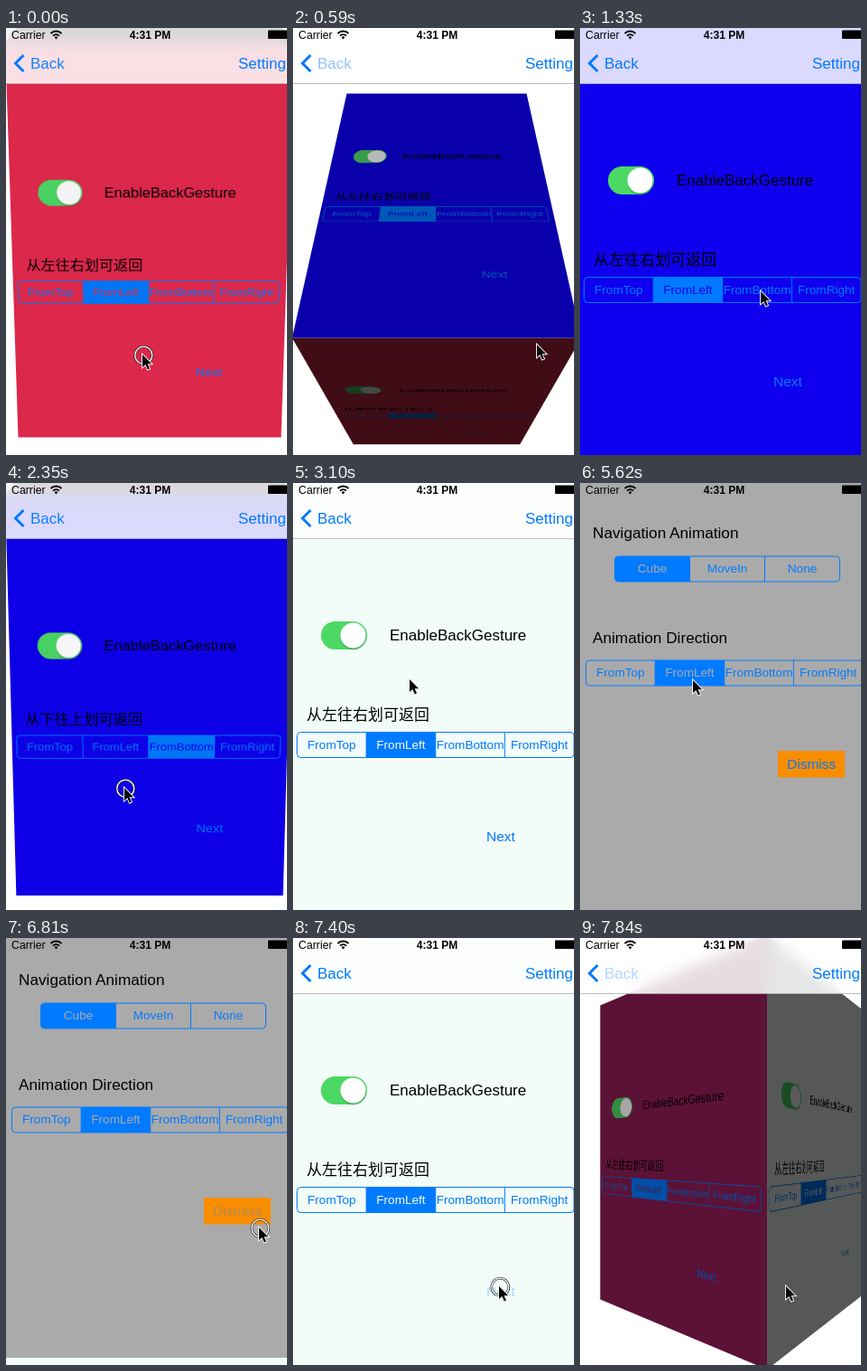
Recreate the animation shown at these times as an HTML page. Size 311 by 472 pixels, loop 7990 ms.

```html
<!DOCTYPE html>
<html lang="zh">
<head>
<meta charset="utf-8">
<style>
html, body { margin: 0; width: 100%; height: 100%; overflow: hidden; background: #fff; }
#stage { position: relative; width: 311px; height: 472px; overflow: hidden; background: #fff; }
#stage > *, .page { position: absolute; left: 0; top: 0; }
#pages { width: 311px; height: 472px; }
.page { left: -1px; top: -3px; width: 320px; height: 480px; }
#bar { width: 311px; height: 61px; background: rgba(255,255,255,.85); backdrop-filter: blur(8px); border-bottom: 1px solid rgba(0,0,0,.25); }
svg { display: block; overflow: hidden; font-family: "Liberation Sans", "Noto Sans CJK SC", "Noto Sans CJK", sans-serif; }
</style>
</head>
<body>
<div id="stage">
  <div id="pages"></div>
  <div id="bar"></div>
  <svg width="311" height="61" font-size="17" fill="#007aff">
    <path d="M19.5 30L10.5 39L19.5 48" fill="none" stroke="#007aff" stroke-width="3"/>
    <text id="back" x="27" y="45" textLength="auto">Back</text>
    <text x="257" y="45">Setting</text>
  </svg>
  <svg id="modal" width="311" height="473" style="background:#aaa"></svg>
  <svg width="311" height="20" font-size="12">
    <text x="6" y="11.5" font-size="12.3">Carrier</text>
    <g fill="none" stroke="#000" stroke-width="1.8">
      <path d="M49.5 6A8.5 8.5 0 0 1 61.5 6M52 8.7A5 5 0 0 1 59 8.7"/>
    </g>
    <path d="M53.6 10.2A2.8 2.8 0 0 1 57.4 10.2L55.5 12.4Z"/>
    <text x="159.5" y="11.5" text-anchor="middle" font-weight="bold">4:31 PM</text>
    <rect x="290" y="2.5" width="24" height="9.5" rx="1"/>
  </svg>
  <svg width="311" height="472">
    <g id="cursor">
      <g id="ring" fill="none">
        <circle cx="1.3" cy=".7" r="9.5" stroke="#222" stroke-width="2.6"/>
        <circle cx="1.3" cy=".7" r="9.5" stroke="#fff" stroke-width="1.3"/>
      </g>
      <path d="M0 0V14L3.3 11L5.8 16.5L8 15.5L5.6 10.3H10.2Z" stroke="#fff" stroke-width="1.8" paint-order="stroke"/>
    </g>
  </svg>
</div>
<script>
const $ = id => document.getElementById(id);
const LOOP = 7990, STEP = 147.6, LAST = 53;
const BLUE = '#007aff', SIDES = ['FromTop', 'FromLeft', 'FromBottom', 'FromRight'];
const RED = '#e52a4e', INDIGO = '#0e00ee', MINT = '#f2fcf8', PLUM = '#8e1c54';

// Rows are [step, value, ...]; values run straight between rows
const PATH = [[0,151,361], [1,185,360], [2,240,358], [3,272,355], [4,270,350], [7,225,310], [9,200,291],
  [11,200,292], [14,131,354], [15,131,354], [16,131,337], [17,131,295], [18,130,240], [19,129,217], [21,129,217],
  [23,250,62], [24,284,42], [28,284,42], [30,182,84], [32,165,114], [35,125,215], [36,125,218], [39,125,218],
  [44,280,320], [47,280,320], [48,270,345], [49,240,412], [50,228,385], [53,228,385]];
const POP_A = [[0,.0417], [1,.15], [2,.32], [3,.42], [4,.72], [5,.93], [6,1]];
const POP_B = [[15,0], [16,.035], [17,.125], [18,.24], [19,.58], [20,.9], [21,1]];
const PUSH = [[51,0], [52,.28], [53,.65]];
const SHEET = [[25,-473], [26,-200], [27,0], [45,0], [46,-9], [47,-433], [48,-473]];
const PRESSES = [[0,3], [10,10], [15,18], [25,25], [36,37], [45,46], [50,51]];

function at(rows, n) {
  const i = rows.findIndex(r => r[0] >= n);
  if (i < 1) return rows[i ? rows.length - 1 : 0].slice(1);
  const a = rows[i - 1], b = rows[i], f = (n - a[0]) / (b[0] - a[0]);
  return a.slice(1).map((v, j) => v + (b[j + 1] - v) * f);
}

const text = (x, y, size, str, extra = '') => `<text x="${x}" y="${y}" font-size="${size}" ${extra}>${str}</text>`;

function segments(x, y, w, names, sel, bg) {
  const cell = w / names.length;
  let out = `<clipPath id="c${y}"><rect x="${x}" y="${y}" width="${w}" height="28" rx="4"/></clipPath>
    <rect x="${x + sel * cell}" y="${y}" width="${cell}" height="28" fill="${BLUE}" clip-path="url(#c${y})"/>
    <rect x="${x}" y="${y}" width="${w}" height="28" rx="4" fill="none" stroke="${BLUE}"/>`;
  names.forEach((name, i) => {
    const left = x + i * cell;
    if (i) out += `<path d="M${left} ${y}v28" stroke="${BLUE}"/>`;
    out += text(left + cell / 2, y + 18.3, 13.6, name, `text-anchor="middle" fill="${i == sel ? bg : BLUE}"`);
  });
  return out;
}

function page(color, sel, style, pressed) {
  const hint = sel == 2 ? '从下往上划可返回' : '从左往右划可返回';
  return `<svg class="page" viewBox="-1 -3 320 480" style="background:${color};${style}">
    <rect x="31" y="153" width="51" height="31" rx="15.5" fill="#4bd964"/>
    <circle cx="66.8" cy="170.5" r="14.3" fill="#000" opacity=".15"/>
    <circle cx="66.5" cy="168.5" r="14" fill="#fff"/>
    ${text(107, 174, 17, 'EnableBackGesture')}
    ${text(15, 262, 17, hint)}
    ${segments(4.5, 275.5, 306.5, SIDES, sel, color)}
    ${text(214, 396, 15.5, 'Next', `fill="${BLUE}" opacity="${pressed ? .3 : 1}"`)}
  </svg>`;
}

// One cube side hinged on the shared edge; side is 1 after the hinge, -1 before it
function face(side, p, flat) {
  const turn = side > 0 ? p : 1 - p, c = Math.cos(turn * Math.PI / 2), k = side * turn * c / 200;
  const move = side * turn * 100, edge = side > 0 ? '0%' : '100%';
  const [m, shift, origin] = flat
    ? [[c,0,0,k, 0,1,0,0], `${move}%,0`, `${edge} 50%`]
    : [[1,0,0,0, 0,c,0,k], `0,${move}%`, `50% ${edge}`];
  return `transform-origin:${origin};transform:translate(${shift}) matrix3d(${m},0,0,1,0,0,0,0,1);filter:brightness(${1 - turn})`;
}

function cube(from, to, p, flat) {
  const [a, selA, down] = from, [b, selB] = to;
  let out = '';
  if (p < 1) out += page(a, selA, p > 0 ? face(1, p, flat) : '', down);
  if (p > 0) out += page(b, selB, p < 1 ? face(-1, p, flat) : '');
  $('pages').innerHTML = out;
  $('back').setAttribute('opacity', Math.abs(1 - 2 * p));
}

function draw(n) {
  const down = PRESSES.some(([a, b]) => n >= a && n <= b);
  const blue = [INDIGO, n > 10 ? 2 : 1], mint = [MINT, 1, n > 49 && down];
  if (n < 9) cube([RED, 1], blue, at(POP_A, n)[0]);
  else if (n < 30) cube(blue, mint, at(POP_B, n)[0]);
  else cube(mint, [PLUM, 1], at(PUSH, n)[0], true);

  $('modal').style.transform = `translateY(${at(SHEET, n)[0]}px)`;
  $('modal').innerHTML = text(14, 61, 17.2, 'Navigation Animation')
    + segments(38.5, 81, 249, ['Cube', 'MoveIn', 'None'], 0, '#aaa')
    + text(14, 177, 17.2, 'Animation Direction')
    + segments(6.5, 196, 306.5, SIDES, n > 36 ? 1 : 2, '#aaa')
    + '<rect x="219" y="296" width="74" height="29.5" fill="#f98d00"/>'
    + text(229, 316, 15.5, 'Dismiss', `fill="${n > 44 ? '#b58a55' : BLUE}"`);

  $('cursor').setAttribute('transform', `translate(${at(PATH, n)})`);
  $('ring').style.display = down ? '' : 'none';
}

let shown = -1;
function tick() {
  const n = Math.min(LAST, Math.floor((performance.now() % LOOP + 15) / STEP));
  if (n != shown) draw(shown = n);
  requestAnimationFrame(tick);
}
tick();
</script>
</body>
</html>
```
